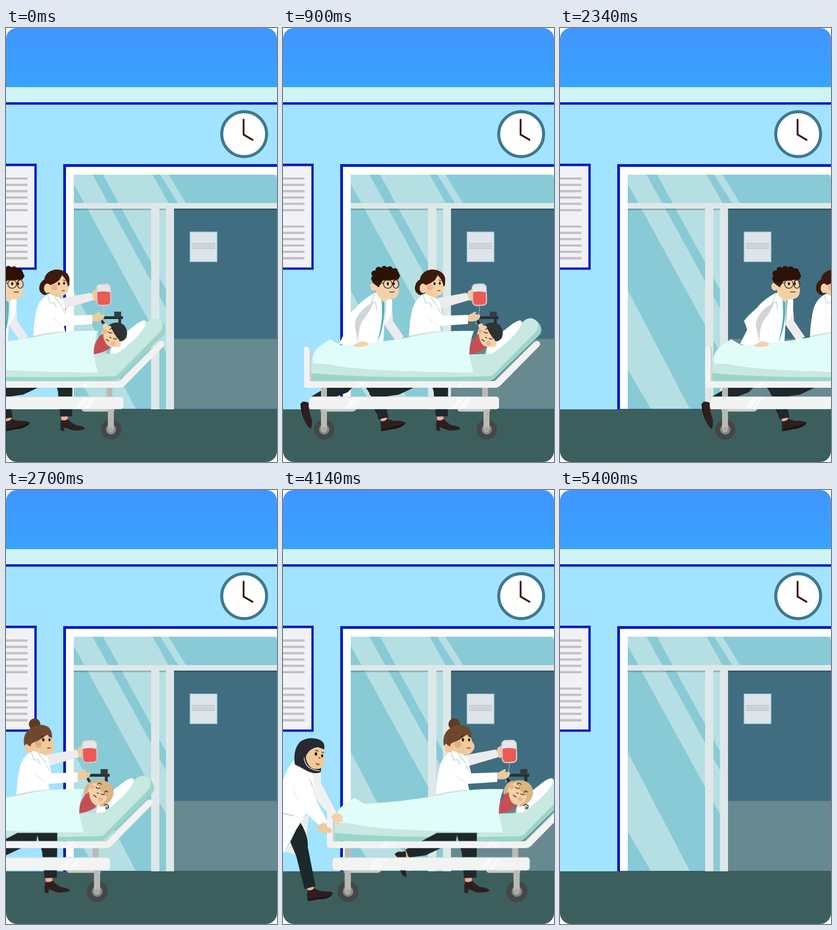
Write an HTML page that moves like this. It is 592x947 px and loops after 6.3 s.

```html
<!DOCTYPE html>
<html lang="en">
<head>
<meta charset="utf-8">
<title>Hospital corridor</title>
<style>
html, body { margin: 0; width: 100%; height: 100%; overflow: hidden; background: #fff; }
svg { display: block; width: 100%; height: 100%; }
.first, .second { animation: 6.3s step-end infinite; }
.first { animation-name: first; }
.second { animation-name: second; }
@keyframes first {
  0% { transform: translateX(-215.5px); }
  14.2857% { transform: none; }
  28.5714% { transform: translateX(271px); }
  42.8571%, 100% { transform: translateX(1200px); }
}
@keyframes second {
  0% { transform: translateX(1200px); }
  42.8571% { transform: translateX(-311.5px); }
  57.1429% { transform: none; }
  71.4286% { transform: translateX(373px); }
  85.7143%, 100% { transform: translateX(1200px); }
}
.blue { fill: #001cc3; }
.bar { fill: #dfe8e8; }
.shine { fill: #b6dfe3; }
.coat { fill: #fff; }
.far { fill: #ececee; }
.fold { fill: #d2d5d6; }
.skin { fill: #f3d2aa; }
.tan { fill: #eecb9c; }
.ankle { fill: #f4ae8e; }
.blush { fill: #f0a78b; opacity: .75; }
.pants { fill: #1c2829; }
.shoe { fill: #2d1f20; }
.heel { fill: #1b1415; }
.eye { fill: #2c150d; }
.lip { fill: #d8574f; }
.red { fill: #c54f52; }
.steel { fill: #babab4; }
.line { fill: none; stroke: #3d1a10; stroke-width: 1.6; stroke-linecap: round; }
.seam { fill: none; stroke: #c3dbdc; stroke-width: 2; }
</style>
</head>
<body>
<svg viewBox="0 0 592 947">
<defs>
  <clipPath id="card"><rect width="592" height="947" rx="24"/></clipPath>
  <clipPath id="upper"><rect x="148" y="320" width="444" height="62"/></clipPath>
  <clipPath id="lower"><rect x="148" y="394" width="202" height="438"/></clipPath>
  <linearGradient id="sky" x2="0" y2="1"><stop stop-color="#4196ff"/><stop offset="1" stop-color="#38a3ff"/></linearGradient>
  <pattern id="rows" y="326" width="47" height="13.8" patternUnits="userSpaceOnUse"><rect width="47" height="5" fill="#c3c1c2"/></pattern>
  <g id="rays" class="shine">
    <path d="M137 320H189L402 707L350 708z"/>
    <path d="M212 320H320L402 465L349 570z"/>
    <path d="M337 320H355L393 382H376z"/>
    <path d="M586 320H592V327z"/>
    <path d="M148 572L284 832H199L148 745z"/>
  </g>

  <g id="wheel">
    <circle cx="90" cy="876" r="22.3" fill="#454648"/>
    <circle cx="90" cy="876" r="11" fill="#7f898b"/>
    <path class="steel" d="M83 831H96V876A6.5 6.5 0 0 1 83 876z"/>
    <circle cx="90" cy="876" r="5.5" fill="#a9a8a2"/>
  </g>

  <g id="mattress">
    <path fill="#9bd5ca" d="M62 727H443L524 643Q542 626 559 644Q568 656 562 668L464 763Q457 770 448 770H62z"/>
    <path fill="#c7e9e2" d="M62 727L443 711L523 642Q539 626 554 639Q561 649 553 662L462 754Q457 760 448 760Q200 766 62 753z"/>
    <path fill="#fff" d="M443 711Q443 693 461 677L498 648Q518 633 522 641Q520 657 492 683Q466 706 457 710z"/>
  </g>
  <path id="shirt" class="red" d="M406 714Q405 692 420 672L428 667Q428 688 444 697Q432 708 406 712z"/>
  <path id="sheet" fill="#e1fdfa" d="M65 717Q68 703 82 693L103 679L125 692Q227 686 300 670Q350 659 417 661Q407 686 407 713L416 752Q180 749 116 737Q83 730 67 733Q63 724 65 717z"/>

  <g id="frame">
    <path class="steel" d="M83 784H96V806H83zM435 784H448V806H435z"/>
    <path fill="#c9c9c4" d="M82 830H161Q158 837 152 837H82zM380 830H452V837H386Q381 836 380 830z"/>
    <use href="#wheel"/><use href="#wheel" x="355"/>
    <path fill="#ced2d3" d="M48 698Q51 692 58 697Q62 700 62 706V770H462L548 685L555 682L467 776H48z"/>
    <path fill="#f1f3f3" d="M46 701Q46 694 52 695Q58 696 58 705V771H464L548 687Q555 680 560 685Q564 690 558 696L475 780Q470 785 464 785H52Q46 785 46 779z"/>
    <rect x="56" y="804" width="416" height="27.5" rx="6" fill="#d5d9da"/>
    <rect x="58" y="805.5" width="414" height="26" rx="6" fill="#f2f4f4"/>
    <path fill="#fff" opacity=".55" d="M168 771H181L170 785H157zM185 771H189L178 785H174zM151 806H164L146 831H133zM168 806H173L155 831H150zM389 771H400L389 785H378zM404 771H408L397 785H393zM385 806H397L379 831H367zM402 806H412L394 831H384z"/>
  </g>

  <g id="stand" fill="#292e33">
    <rect x="427" y="629" width="44" height="6"/><rect x="452" y="619" width="15" height="12" fill="#343a40"/>
    <rect x="461" y="634" width="6" height="22"/><path d="M422 639L426 636L437 652L432 656z"/>
  </g>

  <g id="nurseLegs">
    <path class="ankle" d="M335 845H350L351 856H337zM208 790L217 788L220 804L210 806z"/>
    <path class="shoe" d="M188 798Q194 790 204 793L211 791Q214 804 209 815L213 846Q202 845 198 824Q197 806 188 798z"/>
    <path class="pants" d="M277 753H361L360 847L334 848L329 793L319 758L317 770L253 800L218 805L211 788z"/>
    <path class="shoe" d="M336 855Q343 859 351 853Q359 863 370 867Q386 869 388 875Q377 879 361 878L343 871L342 880L335 878Q333 866 336 855z"/>
  </g>

  <g id="nurse">
    <path class="tan" d="M403 577Q407 571 413 570L415 583Q416 592 411 596L404 593z"/>
    <path class="far" d="M335 590L399 578Q405 578 406 594L345 612z"/>
    <path class="tan" d="M309 575L333 578L336 592L318 590z"/>
    <path class="coat" d="M311 580Q318 584 331 588L341 595L349 628L404 626V646L342 650L346 668L275 675Q276 640 283 612Q291 588 311 580z"/>
    <path fill="#d7dbdd" d="M275 672Q310 663 346 662V668L275 677z"/>
    <path class="fold" d="M312 626Q324 640 341 649Q322 641 312 626zM349 628L336 605Q339 618 349 628z" fill="#bfd8d8"/>
    <path class="seam" d="M306 582L312 600L320 599L326 610M321 586L337 606"/>
    <path class="tan" d="M404 627Q414 622 419 619Q424 619 420 625H430Q432 631 427 636Q418 642 404 640z"/>
    <g transform="rotate(-2 429 582)">
      <rect x="413" y="558" width="32" height="48" rx="9" fill="#d9dbe0" stroke="#b9bec5"/>
      <rect x="415.5" y="561" width="27" height="42" rx="7" fill="#e6e6e9"/>
      <path fill="#ec5a54" d="M415 576Q428 573 443 577V597Q442 604 436 604H421Q415 603 415 597z"/>
    </g>
    <path d="M429 607Q431 616 425 628L421 647" fill="none" stroke="#b9cdd2" stroke-width="1.2"/>
  </g>

  <g id="dozing">
    <path class="line" d="M439 663Q443 667 447 665M450 677Q453 680 457 678M442 675L445 676M434 680Q437 680 440 684"/>
    <circle class="blush" cx="431" cy="662" r="5"/><circle class="blush" cx="449" cy="688" r="5"/>
  </g>
</defs>

<g clip-path="url(#card)">
  <rect width="592" height="947" fill="#a2e3ff"/>
  <rect width="592" height="129" fill="url(#sky)"/>
  <rect y="129" width="592" height="34" fill="#cff4f5"/>
  <rect class="blue" y="162" width="592" height="5.3"/>
  <circle cx="520.3" cy="231.6" r="49" fill="#fff" stroke="#40788f" stroke-width="6.6"/>
  <path d="M481 214l2 2M480 248l2 -1M558 216l2 -2M558 247l2 1" stroke="#99a" stroke-width=".8"/>
  <path d="M519 200V232.500L538.500 244" fill="none" stroke="#3d1609" stroke-width="4" stroke-linecap="round"/>
  <path class="blue" d="M0 296H67V527.500H0z"/>
  <path fill="#f1f2f6" d="M0 301.500H62V522.500H0z"/>
  <rect y="326" width="47" height="75" fill="url(#rows)"/>
  <rect y="326" width="47" height="75" fill="url(#rows)" transform="translate(0 104.700)"/>
  <rect y="500" width="47" height="5" fill="#c3c1c2"/>

  <path class="blue" d="M125 297H592V832H125z"/>
  <path fill="#fff" d="M131 303H592V832H131z"/>
  <path fill="#88cbd6" d="M148 320H592V832H148z"/>
  <use href="#rays" clip-path="url(#upper)"/>
  <use href="#rays" clip-path="url(#lower)"/>
  <path fill="#406e80" d="M367 394H592V679H367z"/>
  <path fill="#678990" d="M367 678.500H592V832H367z"/>
  <path d="M148 394H592V397.500H148z" opacity=".2"/>
  <path class="bar" d="M148 382H592V394H148zM317 394H335V832H317zM349.500 394H367V832H349.500z"/>
  <path fill="#dee5ea" stroke="#8fc6d2" stroke-width="1.5" d="M402 445H461V510H402z"/>
  <path stroke="#b4bbc0" stroke-width="1.5" d="M406 470H457M406 473.700H457M406 477.400H457M406 481H457"/>
  <path fill="#31549a" d="M131 831H317V832H131zM367 831H592V832H367z"/>
  <rect y="832" width="592" height="115" fill="#3c5f5e"/>

  <g class="first">
    <use href="#stand"/>
    <use href="#nurseLegs"/>
    <g>
      <path fill="#3d1a0b" d="M300 583Q285 577 289 562Q291 553 299 549Q302 530 325 527Q350 528 354 546V560L348 572L312 578z"/>
      <path class="skin" d="M311 554L337 538L351 555Q354 571 349 578Q343 585 331 585Q313 584 307 574z"/>
      <ellipse class="skin" cx="306" cy="568" rx="7.500" ry="10.500"/>
      <path fill="#3d1a0b" d="M299 554Q302 530 325 527Q350 528 354 546Q355 557 351 565Q348 548 338 539Q332 555 312 561L308 558z"/>
      <circle class="blush" cx="321" cy="566" r="7"/>
      <ellipse class="eye" cx="331" cy="558" rx="2.200" ry="3.200"/><ellipse class="eye" cx="342.500" cy="557" rx="2" ry="3.200"/>
      <path class="line" d="M327 552L332 549M341 550L345 551"/>
      <path class="lip" d="M336 574Q341 569 345 573Q341 576 336 574z"/>
    </g>
    <use href="#nurse"/>

    <path class="pants" d="M97 783H153L141 795L66 823L57 807zM180 783H250L222 802L230 850L209 855L195 806z"/>
    <path class="ankle" d="M213 853L226 850L228 858L215 861zM54 820L60 814L64 826L57 832z"/>
    <path class="heel" d="M38 820L44 816L50 850L62 873L56 871Q40 850 38 820z"/>
    <path class="shoe" d="M41 816Q50 814 56 818Q56 836 63 855Q64 866 61 875Q47 865 44 842zM213 857Q220 860 228 853Q240 858 251 857Q267 858 268 863Q257 873 236 873L220 878L214 878z"/>
    <path class="heel" d="M214 876L230 872L267 863Q258 874 235 876L215 880z"/>
    <path class="far" d="M231 590Q239 600 240 639L264 674L247 684L222 648z"/>
    <path class="coat" d="M200 578Q171 594 159 611Q141 626 131 639L138 658L122 690L165 697L219 688Q222 640 224 598L214 578z"/>
    <path class="fold" d="M198 597Q156 622 157 650L164 687Q165 650 175 637Q190 619 198 597z"/>
    <path fill="#57b2b0" d="M211 592L222 598Q223 650 206 686Q218 640 216 612z"/>
    <path class="coat" d="M204 576L216 598L215 640L203 686L193 688L198 600z"/>
    <path class="coat" d="M226 590L238 592Q242 622 222 649z"/>
    <path class="seam" d="M200 580L193 601L202 598L205 616"/>
    <path class="skin" d="M203 580L234 588L220 598z"/>
    <path class="skin" d="M202 556L247 548Q253 560 253 573Q253 591 233 592Q210 592 203 574z"/>
    <ellipse class="skin" cx="198" cy="564" rx="7.500" ry="9"/>
    <g fill="#2c1205">
      <path d="M196 556Q193 533 211 527Q235 517 253 533L252 549L218 551L209 566z"/>
      <circle cx="199" cy="547" r="6.500"/><circle cx="200" cy="536" r="7"/><circle cx="209" cy="528" r="7"/>
      <circle cx="221" cy="526" r="7"/><circle cx="233" cy="527" r="7"/><circle cx="244" cy="531" r="7"/><circle cx="249" cy="541" r="6.500"/>
    </g>
    <g fill="none" stroke="#3c2b26" stroke-width="1.700">
      <circle cx="229" cy="558.500" r="9.500"/><ellipse cx="246.500" cy="559" rx="6.500" ry="9"/><path d="M238 557H241M219 557L195 554"/>
    </g>
    <ellipse class="eye" cx="229" cy="558" rx="2.300" ry="3.400"/><ellipse class="eye" cx="242" cy="558" rx="2" ry="3.200"/>
    <path class="line" d="M224 550L232 551M241 552L246 549M233 576L243 576"/>

    <use href="#mattress"/>
    <path fill="#2e3235" d="M438 650Q454 637 472 647Q484 660 478 676Q471 686 461 683L443 659z"/>
    <path class="skin" d="M438 649L444 650Q451 669 463 681L462 692Q455 699 440 694Q424 687 424 668Q426 652 438 649z"/>
    <circle class="skin" cx="460" cy="690" r="6.500"/>
    <circle class="skin" cx="432" cy="650" r="5.500"/>
    <use href="#dozing"/>
    <path class="line" stroke-width="2.500" d="M443 658Q445 654 450 657M459 674Q460 671 464 675"/>
    <use href="#shirt"/><use href="#sheet"/>
    <path class="skin" d="M154 692L168 684Q181 684 186 688Q186 695 174 695Q163 698 154 694z"/>
    <use href="#frame"/>
  </g>

  <g class="second">
    <g id="bun">
      <circle cx="374" cy="511" r="12.500" fill="#5f3a24"/>
      <path fill="#70472d" d="M351 556Q347 530 368 518Q389 507 405 518Q412 525 412 541L380 555L365 572z"/>
      <path class="tan" d="M366 554L402 534L411 541Q413 550 417 554Q421 562 414 570Q408 579 392 578Q370 577 363 568z"/>
      <ellipse class="tan" cx="360" cy="562" rx="7.500" ry="11"/>
      <path fill="#70472d" d="M353 552Q351 526 372 517Q401 507 411 529L412 543Q408 533 399 534Q386 548 367 552L365 560z"/>
      <circle cx="382" cy="555" r="7.500" fill="#e2ad7f"/>
      <ellipse class="eye" cx="393" cy="545" rx="2.500" ry="3.800"/><ellipse class="eye" cx="406.500" cy="545" rx="2.200" ry="3.500"/>
      <path class="line" d="M388 539L394 536M405 537L409 538"/>
      <path class="lip" d="M400 563Q406 559 411 563Q406 566 400 563z"/>
    </g>
    <g transform="translate(142 876) scale(1.039) translate(-90 -876)">
      <use href="#stand"/><use href="#nurse"/><use href="#mattress"/><use href="#nurseLegs"/>
      <g transform="translate(-2 0)">
        <path fill="#d8b581" d="M423 669Q423 650 441 644Q463 638 476 652Q486 668 477 682Q465 699 445 693z"/>
        <path class="skin" d="M437 650L447 647Q454 669 468 677L464 688Q455 698 441 692Q427 684 428 667Q428 655 437 650z"/>
        <path fill="#d8b581" d="M441 648Q426 653 425 670L419 673Q418 651 437 643zM464 686L470 675L475 684Q464 699 450 698z"/>
        <circle class="skin" cx="436" cy="655" r="5.500"/>
        <use href="#dozing" x="5" y="-6"/>
        <path class="line" d="M447 651Q450 646 456 651M463 668Q464 663 469 667"/>
        <path d="M461 696Q467 690 471 697Q470 704 464 702M464 698L469 700" fill="none" stroke="#23272a" stroke-width="1.800"/>
      </g>
      <use href="#shirt"/><use href="#sheet"/><use href="#frame"/>
    </g>

    <g transform="translate(-373)">
      <path class="ankle" d="M262 832L270 825L275 841L266 846zM426 868L439 865L441 874L428 877z"/>
      <path class="far" d="M410 722L430 706L422 770L400 795L378 789z" fill="#dde3e4"/>
      <path class="pants" d="M336 766L367 784L362 804Q331 829 279 851L267 825L325 788Q334 781 336 766zM410 724Q429 755 427 779L444 864L420 871L402 799L389 768z"/>
      <path class="heel" d="M245 840L253 836L254 862L274 886Q259 883 250 865z"/>
      <path class="shoe" d="M248 836L260 833Q263 844 273 848Q273 864 276 876V886Q258 877 253 857zM427 873Q435 875 441 869Q454 877 469 876Q481 876 482 880Q472 890 449 891L427 895Q424 883 427 873z"/>
      <path class="heel" d="M427 893L447 889Q472 890 482 880Q476 893 452 893L428 897z"/>
      <path fill="#f0f1f2" d="M439 612L456 616V640L490 704L480 715L440 670z"/>
      <path class="skin" d="M478 712L490 703L503 711L504 725L498 723L496 730L488 727z"/>
      <path class="coat" d="M399 588L435 611Q444 640 439 665L470 724L458 737L424 706L407 733Q390 756 376 791Q334 775 302 738Q345 695 365 656Q380 606 399 588z"/>
      <path fill="#d6dadc" d="M391 625Q394 655 410 682Q395 662 391 625zM421 614L437 640L440 657L426 620z"/>
      <path d="M361 700Q374 707 397 711" fill="none" stroke="#b9dddd" stroke-width="3"/>
      <path class="tan" d="M447 733L463 725L469 735L479 740Q481 750 473 748Q458 750 447 741z"/>
      <path fill="#282832" d="M399 599Q394 566 411 549Q428 537 451 544Q466 550 463 565L455 616Q441 622 420 610Q410 604 399 599z"/>
      <path class="tan" d="M423 581Q430 564 449 561L463 566V581Q467 595 460 604Q450 612 436 607Q423 597 423 581z"/>
      <path d="M419 584Q421 610 453 613" fill="none" stroke="#fff" stroke-width="1.500"/>
      <ellipse class="eye" cx="445" cy="576" rx="2.800" ry="3.800"/><ellipse class="eye" cx="458.500" cy="580" rx="2.200" ry="3.500"/>
      <path class="line" stroke-width="2.500" d="M444 569Q447 567 450 570M458 572L462 573M451 584L454 585"/>
      <path class="lip" d="M444 595Q449 597 454 597Q451 603 446 600z"/>
    </g>
  </g>
</g>
</svg>
</body>
</html>
```
